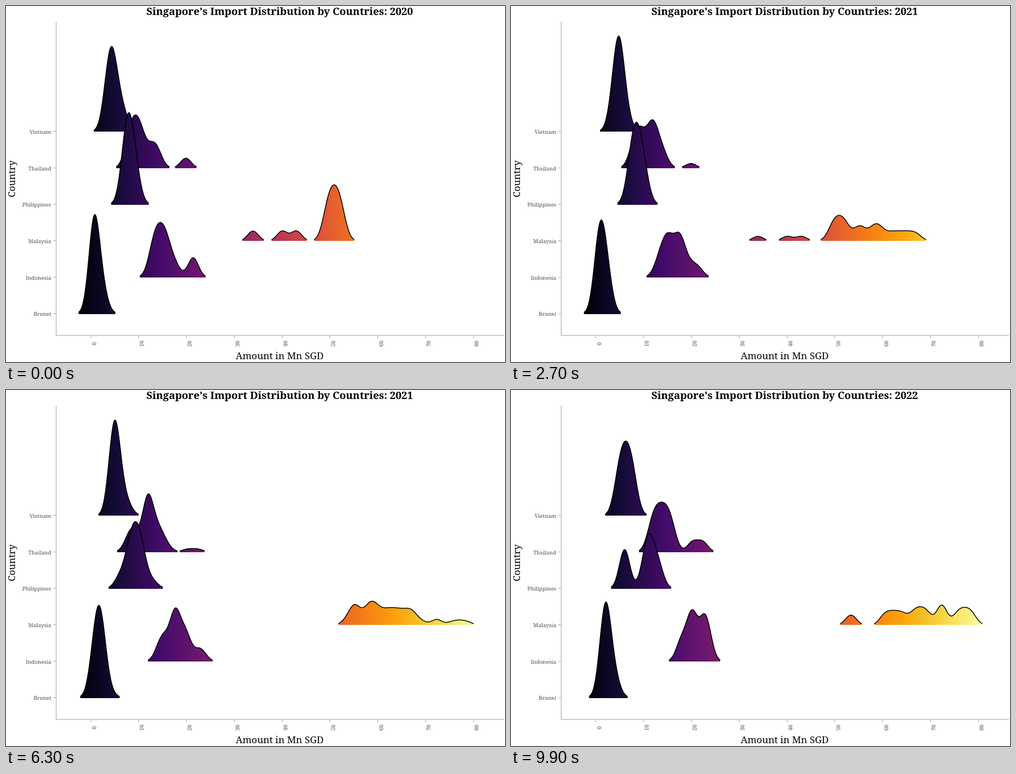
Write an HTML page with a canvas that moves like this. It is 885 px wide and 632 px high and loops after 10000 ms.

```html
<!DOCTYPE html>
<html lang="en">
<head>
<meta charset="utf-8">
<title>Import distribution</title>
<style>
html, body { margin: 0; width: 100%; height: 100%; overflow: hidden; background: #fff; }
canvas, svg { position: absolute; left: 0; top: 0; width: 885px; height: 632px; }
text { font-family: "Noto Serif", serif; }
.tick { font-size: 9.5px; fill: #4d4d4d; }
.axis { font-size: 17px; fill: #000; }
.head { font-size: 18.4px; font-weight: bold; fill: #000; }
</style>
</head>
<body>
<canvas id="plot" width="885" height="632"></canvas>
<svg id="labels" viewBox="0 0 885 632"></svg>
<script>
const LOOP = 10000, STEP = 100, FRAMES = LOOP / STEP;
const PEAK = 17.2;      // height of one month's kernel
const SPREAD = 9.25;    // kernel width
const CUT = 1.95;       // lowest height that is drawn
const LEFT = 128, RIGHT = 838;
const AXIS_X = 89, AXIS_Y = 584.8;
const INFERNO = ['#000004', '#160b39', '#420a68', '#6a176e', '#932667', '#bc3754',
                 '#dd513a', '#f37819', '#fca50a', '#f6d746', '#fcffa4'];

// Twelve months a year, as evenly spaced runs: count, first x, last x.
const run = (n, from, to = from) =>
  Array.from({ length: n }, (_, i) => from + (to - from) * i / Math.max(1, n - 1));
const year = (...runs) => runs.flatMap(r => run(...r));

const rows = [
  ['Vietnam',
    year([8, 178, 192], [4, 190, 210]),
    year([12, 187, 198]),
    year([12, 188, 219])],
  ['Thailand',
    year([8, 216, 243], [3, 256, 270], [1, 319]),
    year([4, 216, 232], [6, 249, 253], [2, 262, 272]),
    year([10, 247, 287], [2, 322, 340])],
  ['Philippines',
    year([10, 209, 224], [2, 231]),
    year([12, 215, 240]),
    year([4, 201.5], [6, 237, 251], [2, 262])],
  ['Malaysia',
    year([1, 438], [2, 490, 515], [9, 567, 597]),
    year([3, 613, 624], [4, 639, 657], [5, 671, 720]),
    year([1, 603], [3, 663, 694], [3, 714, 738], [2, 764], [3, 792, 817])],
  ['Indonesia',
    year([9, 258, 289], [1, 301], [2, 332]),
    year([4, 271, 285], [6, 297, 303], [2, 317]),
    year([2, 302], [5, 317, 325], [5, 339, 350])],
  ['Brunei',
    year([9, 153, 159], [3, 163, 174]),
    year([12, 153, 173]),
    year([10, 162, 173], [2, 180, 187])]
].map(([name, ...years], i) => ({ name, years, base: 222.75 + 64.67 * i }));

const svg = document.getElementById('labels');
const ctx = document.getElementById('plot').getContext('2d');
const tickX = i => 150.3 + 84.84 * i;

function label(str, cls, x, y, anchor, turn = 0) {
  const el = document.createElementNS('http://www.w3.org/2000/svg', 'text');
  el.setAttribute('class', cls);
  el.setAttribute('text-anchor', anchor);
  el.setAttribute('transform', `translate(${x} ${y}) rotate(${turn})`);
  el.textContent = str;
  svg.appendChild(el);
  return el;
}

const head = label('', 'head', 485.5, 16, 'middle');
label('Amount in Mn SGD', 'axis', 485.5, 627, 'middle');
label('Country', 'axis', 15.5, 307, 'middle', -90);
rows.forEach(r => label(r.name, 'tick', 80, r.base + 4.2, 'end'));
for (let i = 0; i < 9; i++) label(i * 10, 'tick', tickX(i) + 9.2, 599.5, 'middle', -90);

const paint = ctx.createLinearGradient(LEFT, 0, RIGHT, 0);
INFERNO.forEach((c, i) => paint.addColorStop(i / (INFERNO.length - 1), c));

const density = (months, x) =>
  PEAK * months.reduce((sum, m) => sum + Math.exp(-(((x - m) / SPREAD) ** 2) / 2), 0);

function line(x1, y1, x2, y2) {
  ctx.beginPath();
  ctx.moveTo(x1, y1);
  ctx.lineTo(x2, y2);
  ctx.stroke();
}

function drawAxes() {
  ctx.strokeStyle = '#bebebe';
  ctx.lineWidth = 1.5;
  line(AXIS_X, 28, AXIS_X, AXIS_Y + 0.7);
  line(AXIS_X, AXIS_Y, 883, AXIS_Y);
  rows.forEach(r => line(84, r.base, AXIS_X, r.base));
  for (let i = 0; i < 9; i++) line(tickX(i), AXIS_Y, tickX(i), 590);
}

function drawHill(pts, floor) {
  const trace = () => pts.forEach(([x, y]) => ctx.lineTo(x, y));
  ctx.beginPath();
  ctx.moveTo(pts[0][0], floor);
  trace();
  ctx.lineTo(pts[pts.length - 1][0], floor);
  ctx.fill();
  ctx.beginPath();
  trace();
  ctx.stroke();
}

function drawRow({ years, base }, u) {
  const k = Math.min(1, Math.floor(u)), f = u - k;
  let hill = [];
  const flush = () => {
    if (hill.length > 1) drawHill(hill, Math.ceil(base));
    hill = [];
  };
  for (let x = 110; x < 860; x += 0.75) {
    const h = (1 - f) * density(years[k], x) + f * density(years[k + 1], x);
    if (h >= CUT) hill.push([x, base - h]);
    else flush();
  }
  flush();
}

function draw(n) {
  const u = 2 * n / (FRAMES - 1);
  head.textContent = `Singapore's Import Distribution by Countries: ${2020 + Math.round(u)}`;
  ctx.fillStyle = '#fff';
  ctx.fillRect(0, 0, 885, 632);
  drawAxes();
  ctx.fillStyle = paint;
  ctx.strokeStyle = '#000';
  ctx.lineWidth = 1.5;
  ctx.lineJoin = 'round';
  rows.forEach(r => drawRow(r, u));
}

const start = performance.now();
let last = -1;
function tick() {
  const n = Math.floor(((performance.now() - start) % LOOP) / STEP);
  if (n !== last) draw(last = n);
  requestAnimationFrame(tick);
}
tick();
</script>
</body>
</html>
```
